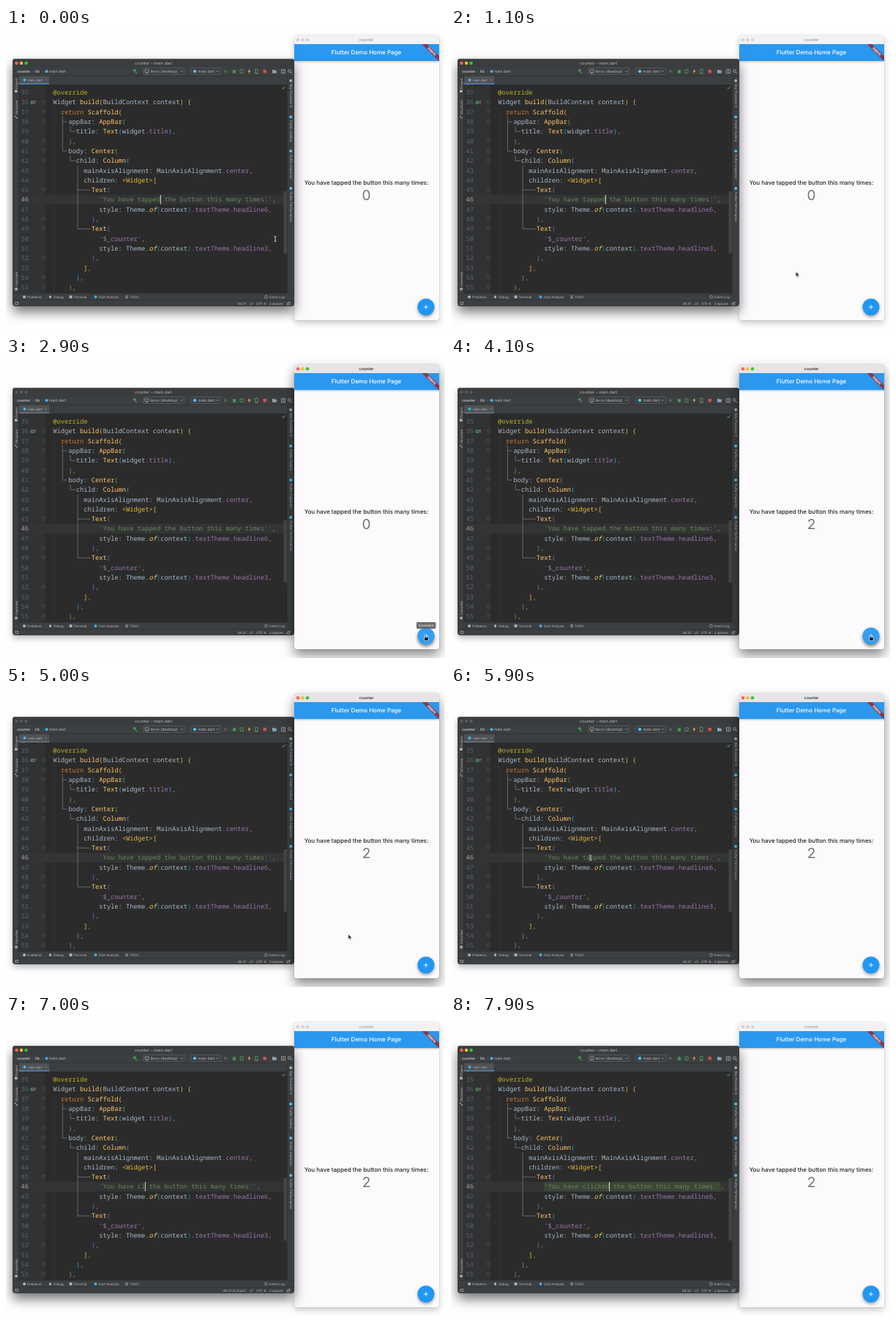
These frames come from a looping animation (600 px wide and 411 px high, 8000 ms). An HTML page:

```html
<!DOCTYPE html>
<html lang="en">
<head>
<meta charset="utf-8">
<title>Counter demo</title>
<style>
  html, body { margin: 0; width: 100%; height: 100%; overflow: hidden; background: #fefefe; }
  #stage { position: relative; width: 600px; height: 411px; overflow: hidden; background: #fefefe; }
  .win, .win svg, #pointer { position: absolute; display: block; }
  .win svg { left: 0; top: 0; border-radius: inherit; }
  text { font-family: Inter, "Open Sans", sans-serif; text-rendering: geometricPrecision; white-space: pre; }
  .code text { font: 500 8.75px "Noto Sans Mono", "DejaVu Sans Mono", monospace; fill: #a9b7c6; }
  .code .num { fill: #606366; }
  .code .now { fill: #a4a3a3; }
  .ui { font-size: 4.4px; fill: #bbbdbf; }
  .bar { font-size: 5.1px; fill: #bbbdbf; }

  #ide { left: 9px; top: 42px; width: 385px; height: 338px; border-radius: 4px; animation: ide 8s step-end infinite; }
  #app { left: 394px; top: 10px; width: 198px; height: 389px; border-radius: 4px; animation: app 8s step-end infinite; }
  @keyframes ide {
    0%, 76.25% { z-index: 2; box-shadow: 0 0 1px #0008, 0 8px 16px #0008; }
    30% { z-index: 1; box-shadow: 0 0 1px #0008, 0 4px 8px #0004; }
  }
  @keyframes app {
    0%, 76.25% { z-index: 1; box-shadow: 0 0 1px #0007, 0 4px 8px #0003; }
    30% { z-index: 2; box-shadow: 0 0 1px #0007, 0 8px 16px #0007; }
  }
  .ideOn { animation: ideOn 8s step-end infinite; }
  .appOn { animation: appOn 8s step-end infinite; }
  @keyframes ideOn { 0%, 76.25% { visibility: visible; } 30% { visibility: hidden; } }
  @keyframes appOn { 0%, 76.25% { visibility: hidden; } 30% { visibility: visible; } }

  #pointer { left: 0; top: 0; z-index: 3; animation: move 8s infinite; }
  @keyframes move {
    0%, 6.25% { transform: translate(368px, 288px); animation-timing-function: ease-in-out; }
    21.25%, 57.5% { transform: translate(574px, 383px); animation-timing-function: ease-in-out; }
    71.25%, 100% { transform: translate(190.5px, 234.5px); }
  }
  .beam { animation: beam 8s step-end infinite; }
  .arrow { animation: arrow 8s step-end infinite; }
  .hand, .hover { animation: hand 8s step-end infinite; }
  @keyframes beam { 0%, 64% { visibility: visible; } 10%, 85% { visibility: hidden; } }
  @keyframes arrow { 0%, 20%, 64% { visibility: hidden; } 10%, 60% { visibility: visible; } }
  @keyframes hand { 0%, 60% { visibility: hidden; } 20% { visibility: visible; } }

  .tip { animation: tip 8s infinite; }
  @keyframes tip { 0%, 32% { opacity: 0; } 34%, 40% { opacity: 1; } 41.5%, 100% { opacity: 0; } }
  .ripple { transform-origin: 574px 381px; animation: ripple 8s infinite; }
  @keyframes ripple {
    0%, 39%, 46.4% { opacity: 0; transform: scale(.2); }
    39.5%, 47% { opacity: .25; transform: scale(.3); }
    43%, 50.5%, 100% { opacity: 0; transform: scale(1); }
  }
  .select { animation: select 8s step-end infinite; }
  .match { animation: match 8s step-end infinite; }
  @keyframes select { 0%, 85% { visibility: hidden; } 78.75% { visibility: visible; } }
  @keyframes match { 0% { visibility: hidden; } 96.25% { visibility: visible; } }
  #caret { animation: caret 8s step-end infinite; }
  @keyframes caret {
    0%, 12.5%, 25%, 76.25% { visibility: visible; }
    6.25%, 18.75%, 30% { visibility: hidden; }
  }
</style>
</head>
<body>
<div id="stage">
  <div class="win" id="ide">
    <svg width="385" height="338" viewBox="9 42 385 338">
      <rect x="9" y="42" width="385" height="338" fill="#3c3f41"/>
      <rect x="9" y="42" width="385" height="11" fill="#3a3c3e"/>
      <path d="M9 42.4H394" stroke="#66686a" stroke-width=".7"/>
      <g fill="#58595b"><circle cx="14.5" cy="48" r="2.2"/><circle cx="21" cy="48" r="2.2"/><circle cx="27.5" cy="48" r="2.2"/></g>
      <g class="ideOn"><circle cx="14.5" cy="48" r="2.2" fill="#ff5f57"/><circle cx="21" cy="48" r="2.2" fill="#febc2e"/><circle cx="27.5" cy="48" r="2.2" fill="#28c840"/></g>
      <text x="201.5" y="50" font-size="5.6" fill="#b4b5b6" text-anchor="middle">counter – main.dart</text>

      <g class="bar">
        <text x="15" y="61" font-size="4.8" font-weight="700">counter</text>
        <text x="35" y="61" fill="#777">›</text><text x="40" y="61" font-weight="600">lib</text><text x="49" y="61" fill="#777">›</text>
        <circle cx="55.5" cy="59.2" r="2" fill="#40b6e0"/><text x="59" y="61">main.dart</text>
        <g fill="none" stroke="#5e6163" stroke-width=".7"><rect x="187.5" y="54.5" width="56" height="9" rx="1.5"/><rect x="252.5" y="54.5" width="41" height="9" rx="1.5"/></g>
        <rect x="190" y="57" width="5" height="3.6" fill="none" stroke="#afb1b3" stroke-width=".7"/><path d="M191 62h3" stroke="#afb1b3" stroke-width=".7"/>
        <text x="197.5" y="61">tervo (desktop)</text>
        <circle cx="258" cy="59.2" r="2.1" fill="#54c5f8"/><text x="262.5" y="61">main.dart</text>
        <path d="M238.5 58.4l1.5 1.5 1.5-1.5M287.5 58.4l1.5 1.5 1.5-1.5" fill="none" stroke="#afb1b3" stroke-width=".7"/>
      </g>
      <path d="M173.5 57.5l2.5-1.6 2 1.6-1.2 1 2.4 3.2-1 .8-2.6-3.4-1 .6z" fill="#499c54"/>
      <path d="M298.5 56.6l4.4 2.6-4.4 2.6z" fill="#5c5f61"/>
      <ellipse cx="312" cy="59.5" rx="1.9" ry="2.5" fill="#499c54"/>
      <path d="M309.3 57.5l5.4 4M314.7 57.5l-5.4 4" stroke="#499c54" stroke-width=".7"/>
      <path d="M320 57h4v4.5h-4zM340.5 56.5h3.5v5.5h-3.5z" fill="none" stroke="#57a064" stroke-width=".8"/>
      <path d="M333.2 55.8l-2.8 3.8h1.8l-.8 3 3-4h-1.9z" fill="#f4af3d"/>
      <path d="M341 61.6l3 1" stroke="#d65f5f"/>
      <rect x="351.5" y="57" width="4.4" height="4.4" fill="#c75450"/>
      <path d="M364 57h2l.7.8h3v4H364z" fill="#8da5b6"/>
      <path d="M376.5 56.8h5v5h-5zM379 56.8v5" fill="none" stroke="#afb1b3" stroke-width=".7"/>
      <circle cx="387.5" cy="58.6" r="1.9" fill="none" stroke="#afb1b3" stroke-width=".8"/><path d="M389 60.2l2 2" stroke="#afb1b3" stroke-width=".9"/>
      <path d="M9 65.3H394" stroke="#323232" stroke-width=".7"/>

      <rect x="17.5" y="65.7" width="41.5" height="11.5" fill="#4e5254"/>
      <rect x="17.5" y="75.7" width="41.5" height="1.5" fill="#747a80"/>
      <rect class="ideOn" x="17.5" y="75.7" width="41.5" height="1.5" fill="#4a88c7"/>
      <circle cx="25.5" cy="71" r="2" fill="#40b6e0"/><text class="ui" x="30" y="72.6" font-size="4.9">main.dart</text>
      <path d="M53.4 69.8l2.2 2.2m0-2.2l-2.2 2.2" stroke="#8a8c8e" stroke-width=".5"/>

      <svg x="17.5" y="77.2" width="367" height="285" viewBox="17.5 77.2 367 285">
        <rect x="17.5" y="77" width="367" height="286" fill="#2b2b2b"/>
        <rect x="17.5" y="77" width="36" height="286" fill="#303234"/>
        <rect x="17.5" y="227.7" width="367" height="13.3" fill="#333435"/>
        <rect x="379.5" y="223" width="4.5" height="85" fill="#434546"/>
        <rect class="match" x="127.2" y="227.7" width="241.5" height="13.3" fill="#3b463a"/>
        <rect class="select" x="179.7" y="227.7" width="31.5" height="13.3" fill="#214283"/>
        <path d="M66 107V363" stroke="#373838" stroke-width=".7"/>
        <path d="M77.3 120V168M77.3 128h6M77.3 168h6M88 134v7.3h7M88 174v7.3h7M98 188v86.3h17.5M98 221.2h17.5" fill="none" stroke="#75797c" stroke-width=".8"/>
        <g id="code" class="code"></g>
        <circle cx="36" cy="101.5" r="2.6" fill="#3f8f5f"/><circle cx="36" cy="101.5" r="1" fill="#303234"/>
        <path d="M40 104v-4.6m-1.3 1.6l1.3-1.7 1.3 1.7" fill="none" stroke="#d25252" stroke-width=".8"/>
        <rect id="caret" y="228" width="1" height="12.6" fill="#d8d8d8"/>
        <path d="M377.5 81.5l1.5 1.7 2.7-3.6" fill="none" stroke="#59a869"/>
      </svg>

      <path d="M17.3 65.5V362.5M384.7 65.5V362.5M9 362.5H394M9 371.7H394" stroke="#2f3133" stroke-width=".6"/>
      <g id="side" class="ui"></g>
      <path d="M12 84.6h3.6v3.4H12zM12 120h1.6v1.6H12zM14 122h1.6v1.6H14z" fill="#afb1b3"/>
      <path d="M14 353.6l.8 1.8 1.9.2-1.4 1.3.4 1.9-1.7-1-1.7 1 .4-1.9-1.4-1.3 1.9-.2z" fill="#afb1b3"/>

      <g class="ui">
        <circle cx="25" cy="367.2" r="2" fill="#afb1b3"/><text x="29" y="368.8">Problems</text>
        <ellipse cx="60.5" cy="367.2" rx="1.5" ry="2" fill="#afb1b3"/><text x="65" y="368.8">Debug</text>
        <rect x="86.5" y="365.3" width="4" height="3.8" fill="#afb1b3"/><text x="92.5" y="368.8">Terminal</text>
        <circle cx="122.5" cy="367.2" r="1.9" fill="#40b6e0"/><text x="127" y="368.8">Dart Analysis</text>
        <path d="M163 365.8h4M163 367.3h4M163 368.8h4" stroke="#afb1b3" stroke-width=".7"/><text x="169" y="368.8">TODO</text>
        <circle cx="355.5" cy="367.2" r="1.9" fill="none" stroke="#afb1b3" stroke-width=".7"/><text x="360" y="368.8">Event Log</text>
        <rect x="13" y="374.3" width="3.6" height="3.4" fill="none" stroke="#afb1b3" stroke-width=".7"/>
        <text id="pos" x="328" y="377.8" text-anchor="end"></text>
        <text x="333" y="377.8">LF</text><text x="342" y="377.8">UTF-8</text><text x="360" y="377.8">2 spaces</text>
        <path d="M384 375.5h3.6v2.6H384zM386.5 375.5v-1q1-1.4 2 0v.6" fill="none" stroke="#afb1b3" stroke-width=".7"/>
      </g>
    </svg>
  </div>

  <div class="win" id="app">
    <svg width="198" height="389" viewBox="394 10 198 389">
      <rect x="394" y="10" width="198" height="389" fill="#fcfafc"/>
      <rect x="394" y="10" width="198" height="12" fill="#f4f1f4"/>
      <rect class="appOn" x="394" y="10" width="198" height="12" fill="#e7e4e7"/>
      <g fill="#d5d2d5"><circle cx="399" cy="16.2" r="2.2"/><circle cx="405.5" cy="16.2" r="2.2"/><circle cx="412" cy="16.2" r="2.2"/></g>
      <g class="appOn"><circle cx="399" cy="16.2" r="2.2" fill="#ff5f57"/><circle cx="405.5" cy="16.2" r="2.2" fill="#febc2e"/><circle cx="412" cy="16.2" r="2.2" fill="#28c840"/></g>
      <text x="492.5" y="18.2" font-size="5.4" font-weight="500" fill="#999" text-anchor="middle">counter</text>
      <text class="appOn" x="492.5" y="18.2" font-size="5.4" font-weight="500" fill="#444" text-anchor="middle">counter</text>

      <rect x="394" y="24" width="198" height="22.3" fill="#000" opacity=".22" style="filter:blur(1.3px)"/>
      <rect x="394" y="22" width="198" height="23" fill="#2b98f0"/>
      <text x="492.5" y="36.4" font-size="8" font-weight="500" fill="#fff" text-anchor="middle">Flutter Demo Home Page</text>
      <svg x="560" y="22" width="32" height="32" viewBox="-32 0 32 32">
        <g transform="rotate(45)">
          <rect x="-17" y="11.7" width="34" height="5" fill="#853b50"/>
          <text y="15.7" font-size="4.1" font-weight="800" fill="#fff" text-anchor="middle">DEBUG</text>
        </g>
      </svg>

      <text x="492.5" y="214" font-size="8" font-weight="500" fill="#242324" text-anchor="middle">You have tapped the button this many times:</text>
      <text id="count" x="492.5" y="234.5" font-size="19" fill="#767476" text-anchor="middle">0</text>

      <circle cx="574" cy="383" r="11.5" fill="#000" opacity=".35" style="filter:blur(2px)"/>
      <circle class="hover" cx="574" cy="384" r="11.7" fill="#000" opacity=".2" style="filter:blur(2px)"/>
      <circle cx="574" cy="381" r="11.5" fill="#2196f3"/>
      <circle class="hover" cx="574" cy="381" r="11.5" fill="#fff" opacity=".08"/>
      <circle class="ripple" cx="574" cy="381" r="11.5" fill="#fff"/>
      <path d="M571.1 381h5.8M574 378.1v5.8" stroke="#fff" stroke-width=".95"/>
      <g class="tip">
        <rect x="561" y="362" width="26.5" height="9" rx="1.6" fill="#616161" opacity=".92"/>
        <text x="574.2" y="368" font-size="4.2" fill="#fff" text-anchor="middle">Increment</text>
      </g>
    </svg>
  </div>

  <svg id="pointer" width="1" height="1" overflow="visible">
    <path class="beam" d="M-1.5-3.5q1.5 0 1.5 1V2.5q0 1-1.5 1M1.5-3.5q-1.5 0-1.5 1M0 2.5q0 1 1.5 1" fill="none" stroke="#e4e4e4" stroke-width=".9"/>
    <path class="arrow" d="M0-3V4l1.6-1.4 1.2 2.6 1.1-.5-1.2-2.5H5z" fill="#111" stroke="#fff" stroke-width=".6"/>
    <path class="hand" d="M-1.3 1V-3q.7-1 1.4 0V-.6l2.6.6q.8.3.6 1.3L2.7 4.5H-1L-3 1.6q.2-1 1-.6z" fill="#111" stroke="#fff" stroke-width=".6"/>
  </svg>
</div>

<script>
const $ = id => document.getElementById(id);
const LOOP = 8000, LEFT = 64.2, CHAR = 5.25, ROW = 13.3, FIRST = 35, EDITED = 46;
const baseline = n => 91.1 + (n - FIRST) * ROW;
const message = word => `            'You have ${word} the button this many times:',`;

const lines = `@override
Widget build(BuildContext context) {
  return Scaffold(
    appBar: AppBar(
      title: Text(widget.title),
    ),
    body: Center(
      child: Column(
        mainAxisAlignment: MainAxisAlignment.center,
        children: <Widget>[
          Text(
${message("tapped")}
            style: Theme.of(context).textTheme.headline6,
          ),
          Text(
            '$_counter',
            style: Theme.of(context).textTheme.headline3,
          ),
        ],
      ),
    ),`.split("\n");

// Colour rules in order of priority; brackets are coloured by depth.
const rules = [
  [/^'\$_counter'/, "#9876aa"],
  [/^'.*'/, "#6a8759"],
  [/^@\w+/, "#bbb529"],
  [/^return\b/, "#cc7832"],
  [/^of(?=\()/, "#ffc66d", "italic"],
  [/^(build|[A-Z]\w*)(?=\()/, "#ffc66d"],
  [/^\.(title|center|textTheme|headline\d)/, "#9876aa"],
  [/^<\w+>\[|^\]/, "#e8ba36"],
  [/^[{]/, "#d3b26c"],
  [/^[,;]/, "#cc7832"],
  [/^(\w+|\s+|.)/, "#a9b7c6"]
];
const brackets = ["#e8ba36", "#54a857", "#359ff4", "#6673c4", "#179387"];
let depth = 0;

function paint(line) {
  let out = "", rest = line.trimStart();
  while (rest) {
    let part, fill, style = "normal";
    if (rest[0] === "(" || rest[0] === ")") {
      part = rest[0];
      fill = brackets[part === "(" ? depth++ : --depth];
    } else {
      const rule = rules.find(r => r[0].test(rest));
      part = rest.match(rule[0])[0];
      fill = rule[1];
      style = rule[2] || style;
    }
    out += `<tspan fill="${fill}" font-style="${style}">${part.replace(/</g, "&lt;")}</tspan>`;
    rest = rest.slice(part.length);
  }
  return out;
}

const number = n => `<text class="num ${n === EDITED ? "now" : ""}" x="20.5" y="${baseline(n)}">${n}</text>`;
const fold = n => {
  const y = baseline(n) - 3;
  return `<path d="M49.2 ${y - 2.3}h4v3l-2 1.8-2-1.8zM50.2 ${y - .3}h2" fill="#2b2b2b" stroke="#5a5d5f" stroke-width=".6"/>`;
};

$("code").innerHTML = number(FIRST - 1) + lines.map((line, i) => {
  const n = FIRST + i, x = LEFT + line.search(/\S/) * CHAR;
  const mark = /[({[]$|^\s*[)\]],$/.test(line) && n !== 44 && n !== 53 ? fold(n) : "";
  return number(n) + mark + `<text id="line${n}" x="${x}" y="${baseline(n)}">${paint(line)}</text>`;
}).join("");

const sideLabel = (label, x, y, turn) => `<text transform="translate(${x} ${y}) rotate(${turn})">${label}</text>`;
const tool = (label, y, color) =>
  `<circle cx="389.2" cy="${y}" r="1.9" fill="${color}"/>` + sideLabel(label, 387.7, y + 4.5, 90);
$("side").innerHTML =
  sideLabel("Project", 15.6, 83, -90) + sideLabel("Structure", 15.6, 118, -90) + sideLabel("Favorites", 15.6, 352, -90) +
  tool("Key Promoter X", 72, "#afb1b3") + tool("Flutter Outline", 121.5, "#54c5f8") +
  tool("Flutter Inspector", 168, "#54c5f8") + tool("Flutter Performance", 219, "#54c5f8");

const typed = t => t < 6800 ? "tapped" : "clicked".slice(0, 1 + Math.floor((t - 6800) / 110));
let shown;

function draw(t) {
  const word = typed(t);
  if (word !== shown) {
    shown = word;
    $("line" + EDITED).innerHTML = paint(message(word));
    $("caret").setAttribute("x", LEFT + (22 + word.length) * CHAR - .4);
  }
  $("count").textContent = t < 3200 ? 0 : t < 3800 ? 1 : 2;
  $("pos").textContent = t < 6300 ? "46:31" : t < 7300 ? "46:31 (6 chars)" : "46:32";
}

const start = performance.now();
function tick() {
  draw((performance.now() - start) % LOOP);
  requestAnimationFrame(tick);
}
tick();
</script>
</body>
</html>
```
